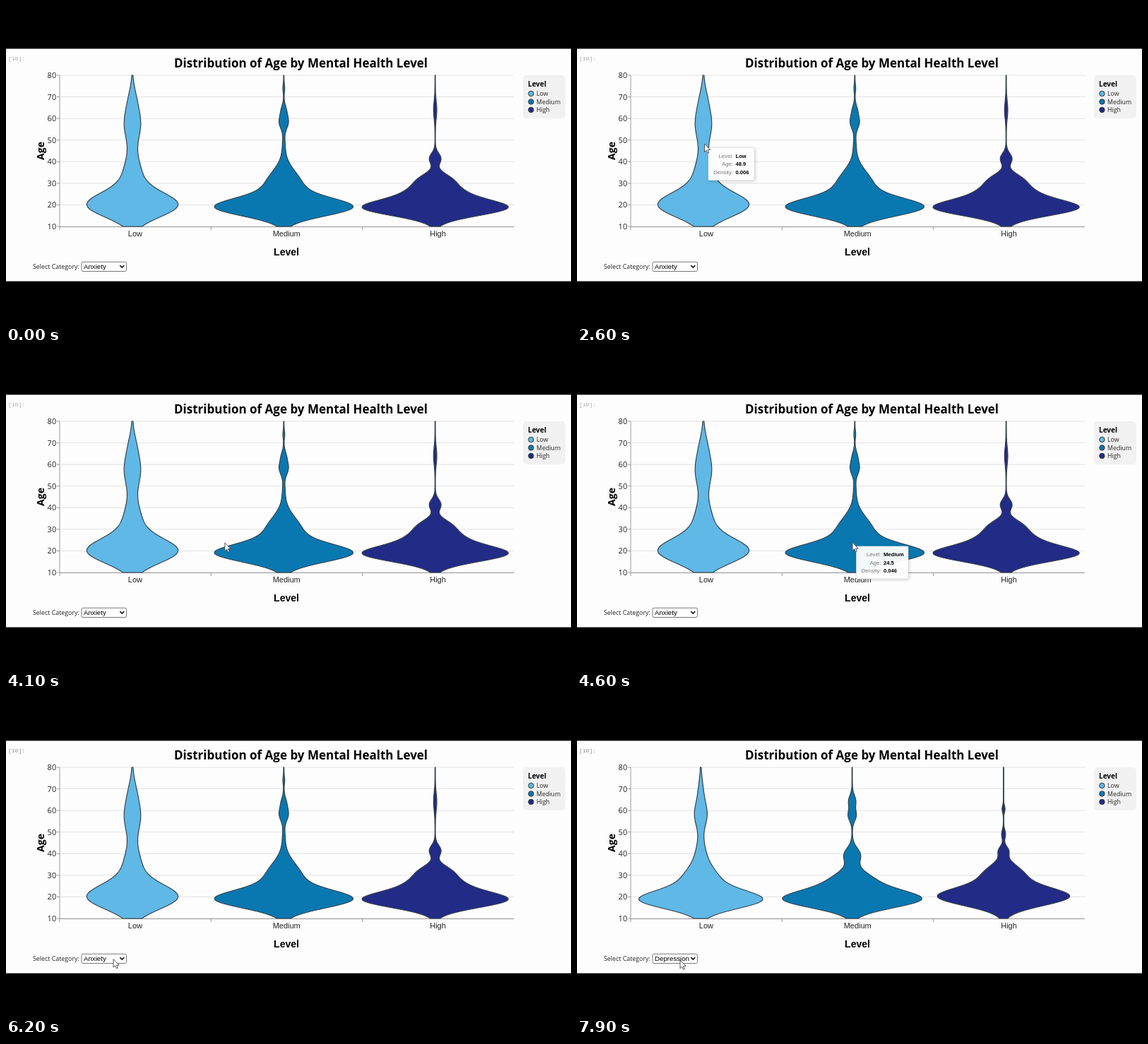
An HTML page for the animation above (8000 ms loop, 800 px wide and 450 px high).

```html
<!DOCTYPE html>
<html lang="en">
<head>
<meta charset="utf-8">
<title>Distribution of Age by Mental Health Level</title>
<style>
  html, body { margin: 0; width: 100%; height: 100%; overflow: hidden; background: #000; }
  svg { display: block; width: 100%; height: 100%; }
  text { font-family: "Open Sans", "Noto Sans", sans-serif; fill: #222; }
  .arial { font-family: "Liberation Sans", Arial, sans-serif; }
  .mono { font-family: "Liberation Mono", monospace; }
  .bold { font-weight: 700; fill: #000; }
  .mid { text-anchor: middle; }
  .end { text-anchor: end; }
  .violin { stroke: #35414c; stroke-width: 1.2; stroke-linejoin: round; }
  #tip { filter: drop-shadow(1px 1px 2px rgba(0, 0, 0, .2)); }
</style>
</head>
<body>
<svg id="stage" viewBox="0 0 800 450">
  <clipPath id="page"><rect y="60.5" width="800" height="329"/></clipPath>
  <rect width="800" height="450" fill="#000"/>
  <rect y="60.5" width="800" height="329" fill="#fdfdfd"/>
  <text id="prompt" class="mono" x="3" y="77" font-size="8">[10]:</text>
  <text class="bold mid" x="417.5" y="86.5" font-size="17">Distribution of Age by Mental Health Level</text>
  <g id="axes"></g>
  <g id="violins"></g>
  <text class="bold mid" transform="translate(54 205) rotate(-90)" font-size="14">Age</text>
  <text class="arial bold mid" x="397" y="353" font-size="14">Level</text>
  <g id="legend">
    <rect x="732" y="98" width="60" height="61" rx="5" fill="#f1f1f1"/>
    <text class="bold" x="739" y="114" font-size="10">Level</text>
  </g>
  <text x="38" y="371.8" font-size="8.85">Select Category:</text>
  <rect x="107" y="362.2" width="63.5" height="13.3" rx="2" fill="#fff" stroke="#777"/>
  <text id="choice" class="arial" x="110" y="372.2" font-size="9.7" style="fill:#000"></text>
  <path d="M161.3 367l3 3 3-3" fill="none" stroke="#111" stroke-width="1.7"/>
  <g clip-path="url(#page)">
    <g id="tip"></g>
    <path id="cursor" d="M0 0V11.6L2.7 9.2L4.5 13.2L6.4 12.4L4.6 8.5H8.2Z" fill="#fff" stroke="#444" stroke-width=".9" stroke-linejoin="round"/>
  </g>
</svg>
<script>
const DURATION = 8000, STEP = 100, SWITCH_AT = 7500;
const TOP = 98, BOTTOM = 312, LEFT = 76, RIGHT = 719;
const MIN_AGE = 10, MAX_AGE = 80;
const LEVELS = ["Low", "Medium", "High"];
const COLORS = ["#5fb8e6", "#0a78b0", "#222b85"];
const $ = id => document.getElementById(id);

const ageAt = y => MIN_AGE + (BOTTOM - y) / (BOTTOM - TOP) * (MAX_AGE - MIN_AGE);
const yAt = age => BOTTOM - (age - MIN_AGE) / (MAX_AGE - MIN_AGE) * (BOTTOM - TOP);

function add(parent, tag, attrs, text) {
  const node = document.createElementNS("http://www.w3.org/2000/svg", tag);
  for (const key in attrs) node.setAttribute(key, attrs[key]);
  if (text !== undefined) node.textContent = text;
  parent.append(node);
  return node;
}

// Half width of a violin: a sum of bell curves over age, like a density estimate.
const bell = (height, mean, spread) => age => height * Math.exp(-(((age - mean) / spread) ** 2) / 2);
const mix = (...bells) => y => bells.reduce((sum, f) => sum + f(ageAt(y)), .3);

const charts = {
  Anxiety: violins(179,
    mix(bell(60, 19.8, 5.6), bell(13, 32.6, 8.5), bell(11, 57.4, 7.5), bell(3, 69.5, 5.5)),
    mix(bell(88, 18.8, 4.1), bell(26, 28.6, 6.9), bell(1.2, 48, 4), bell(6, 58.2, 2.9), bell(3, 63.6, 2.6), bell(1, 74, 1.8)),
    mix(bell(100, 18.7, 3.75), bell(30, 26.4, 3.6), bell(16, 32.2, 2.9), bell(8, 41.4, 2.5), bell(2, 64, 4))),
  Depression: violins(175.3,
    mix(bell(78, 18.5, 4.1), bell(25, 27, 5.9), bell(6, 39.4, 6.5), bell(8.3, 58, 5.5), bell(2.7, 69, 5.5)),
    mix(bell(92, 18.8, 4), bell(29, 27, 4.6), bell(11, 39.4, 3.3), bell(5.4, 57.7, 2.6), bell(4.8, 64.3, 2.7)),
    mix(bell(91, 20.1, 4.25), bell(27, 30.3, 4.6), bell(6, 41.4, 2.1), bell(2.5, 49, 2), bell(1.8, 60.7, 1.5)))
};

function outline(center, width) {
  const left = [], right = [];
  for (let y = TOP; y <= BOTTOM; y++) {
    const w = width(y);
    right.push((center + w).toFixed(2) + " " + y);
    left.unshift((center - w).toFixed(2) + " " + y);
  }
  return "M" + right.concat(left).join("L") + "Z";
}

function violins(firstCenter, ...widths) {
  const group = add($("violins"), "g", {});
  const shapes = widths.map((width, i) => {
    const center = firstCenter + i * (RIGHT - LEFT) / 3;
    add(group, "path", { class: "violin", d: outline(center, width), fill: COLORS[i] });
    return { center, width, level: LEVELS[i] };
  });
  return { group, shapes };
}

// Axes and legend
const axes = $("axes");
const line = (x1, y1, x2, y2, stroke) => add(axes, "line", { x1, y1, x2, y2, stroke });
for (let age = MIN_AGE; age <= MAX_AGE; age += 10) {
  const y = yAt(age);
  line(LEFT, y, RIGHT, y, "#e2e2e2");
  line(LEFT - 4, y, LEFT, y, "#999");
  add(axes, "text", { class: "end", x: 71.2, y: y + 4, "font-size": 11 }, age);
}
line(LEFT, TOP, LEFT, BOTTOM, "#999");
line(LEFT, BOTTOM + .5, RIGHT, BOTTOM + .5, "#999");
LEVELS.forEach((level, i) => {
  const band = (RIGHT - LEFT) / 3, x = LEFT + band * i, y = 124 + 11.5 * i;
  line(x, BOTTOM, x, BOTTOM + 5, "#999");
  add(axes, "text", { class: "arial mid", x: x + band / 2 - .3, y: 325.6, "font-size": 11 }, level);
  add($("legend"), "circle", { cx: 743.4, cy: y, r: 3.7, fill: COLORS[i], stroke: "#333" });
  add($("legend"), "text", { x: 751, y: y + 3.2, "font-size": 8.8 }, level);
});

// Tooltip
const tip = $("tip");
const tipBox = add(tip, "rect", { height: 46, rx: 1.5, fill: "#fff", "fill-opacity": .95, stroke: "#ddd", "stroke-width": .7 });
const tipValues = ["Level:", "Age:", "Density:"].map((label, i) => {
  const y = 14 + 11.5 * i;
  add(tip, "text", { class: "arial end", x: 35, y, "font-size": 7.7, style: "fill:#777" }, label);
  return add(tip, "text", { class: "arial bold", x: 38.5, y, "font-size": 7.6 });
});

function showTip(shape, x, y) {
  tip.style.display = shape ? "" : "none";
  if (!shape) return;
  const values = [shape.level, (ageAt(y) + .6).toFixed(1), (shape.width(y) * .00075).toFixed(3)];
  values.forEach((value, i) => tipValues[i].textContent = value);
  tipBox.setAttribute("width", shape.level === "Medium" ? 73.5 : 65);
  tip.setAttribute("transform", `translate(${x + 5.5} ${y + 5.5})`);
}

// Pointer stops: time, x, y
const ROUTE = [
  [600, 792, 190], [1200, 481, 141], [1900, 62, 354], [2600, 180.5, 195], [3400, 177, 271],
  [4600, 390, 269.5], [5200, 606, 270], [5900, 165, 366], [6200, 152, 369.5],
  [7000, 146, 391], [7500, 146, 391], [7900, 146, 371]
];

function pointerAt(t) {
  const next = ROUTE.findIndex(p => p[0] > t);
  if (next < 0) return ROUTE.at(-1).slice(1);
  const [t0, x0, y0] = ROUTE[next - 1], [t1, x1, y1] = ROUTE[next];
  const u = (t - t0) / (t1 - t0), e = u * u * (3 - 2 * u);
  return [x0 + (x1 - x0) * e, y0 + (y1 - y0) * e];
}

function draw(now) {
  const t = Math.floor(now % DURATION / STEP) * STEP;
  const choice = t < SWITCH_AT ? "Anxiety" : "Depression";
  $("choice").textContent = choice;
  for (const name in charts) charts[name].group.style.display = name === choice ? "" : "none";
  $("prompt").style.fill = t < 5500 ? "#aaa" : "#888";

  const visible = t >= ROUTE[0][0];
  $("cursor").style.display = visible ? "" : "none";
  if (visible) {
    const [x, y] = pointerAt(t);
    $("cursor").setAttribute("transform", `translate(${x} ${y})`);
    const inside = s => y > TOP && y < BOTTOM && Math.abs(x - s.center) < s.width(y);
    showTip(charts[choice].shapes.find(inside), x, y);
  } else showTip(null);
}

const start = performance.now();
function tick() {
  draw(performance.now() - start);
  requestAnimationFrame(tick);
}
tick();
</script>
</body>
</html>
```
